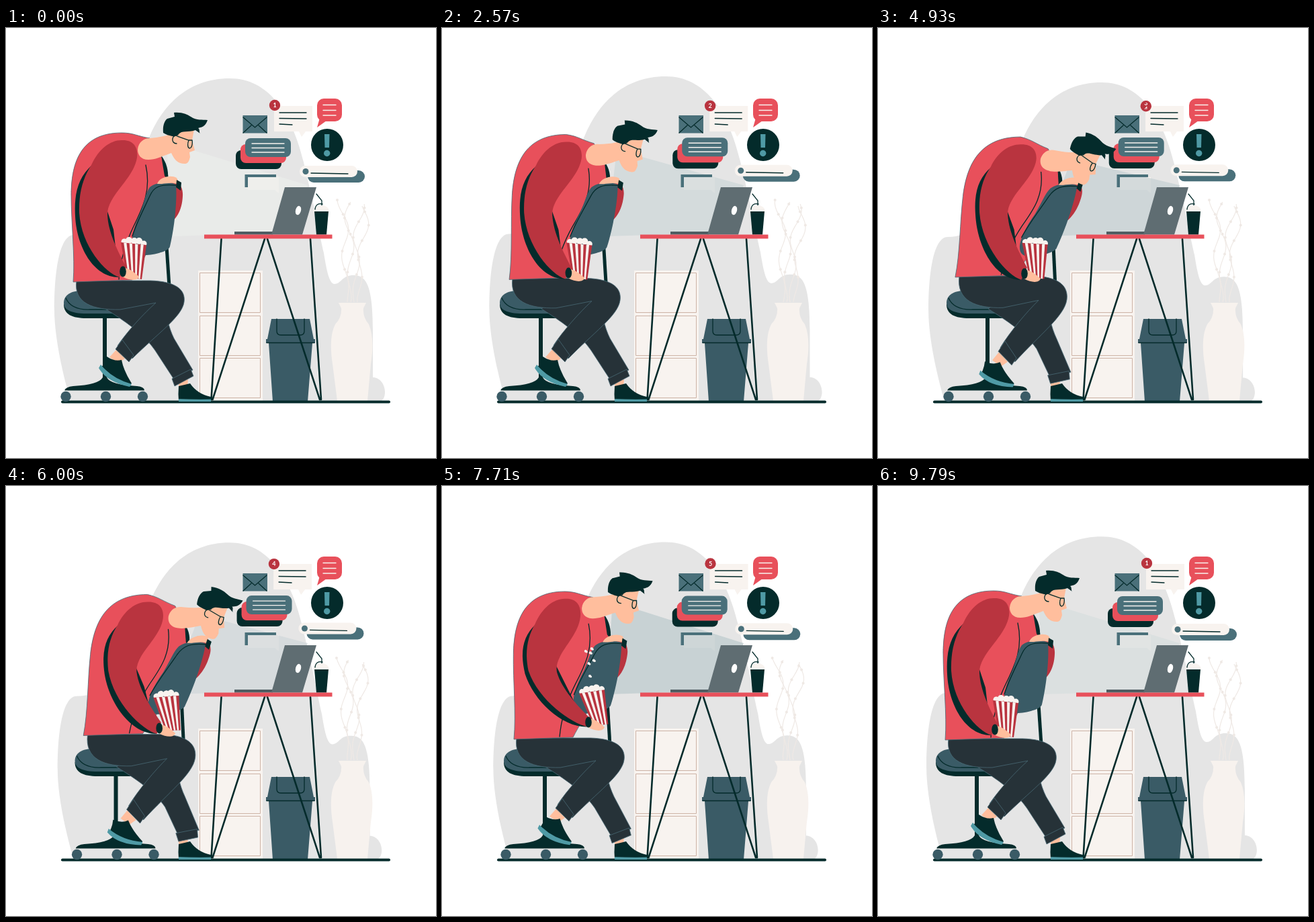
An HTML page that plays this animation: 640 by 640 pixels, repeating every 9870 ms.

```html
<!DOCTYPE html>
<html lang="en">
<head>
<meta charset="utf-8">
<title>Distracted at the desk</title>
<style>
html, body { margin: 0; height: 100%; overflow: hidden; background: #fff; }
svg { display: block; width: 100vw; height: 100vh; }
.red { fill: #e8505b; } .crimson { fill: #b9343f; } .dark { fill: #042b2b; }
.teal { fill: #3a5b66; } .mid { fill: #4a707a; } .sky { fill: #4f9aa5; }
.skin { fill: #ffbe9d; } .pants { fill: #263238; } .pale { fill: #f8f3ef; }
.ink, .chalk { fill: none; stroke: #042b2b; stroke-width: 1.3; stroke-linecap: round; }
.chalk { stroke: #f8f3ef; }
.edge { stroke: #4a6a75; stroke-width: .8; }
text { font: bold 9px Lato, sans-serif; fill: #fff; text-anchor: middle; }
</style>
</head>
<body>
<svg viewBox="0 0 640 640">
  <clipPath id="window"><circle cx="400" cy="115" r="5"/></clipPath>
  <path id="blob" fill="#e5e5e5" d="M96 555C80 500 72 450 72 420C72 360 80 308 101 308C160 308 180 240 213 163C235 110 275 75 333 75C390 75 425 125 443 200C460 270 465 300 473 335C477 360 481 381 489 381C499 381 500 368 517 368C535 368 546 380 546 450V520C556 520 564 530 564 542C564 550 560 555 558 555Z"/>

  <path class="pale" d="M286 361H382V555H286Z"/>
  <path fill="none" stroke="#cdb3a6" d="M288.500 364.500h90v59h-90zM288.500 428.500h90v59h-90zM288.500 491.500h90v59h-90z"/>
  <path class="teal" d="M395 433H452L458 463H460V469H456L449 556H397L391 469H387V463H389Z"/>
  <path class="ink" d="M388 468.500H459M403 433V451Q403 457 409 457H438Q444 457 444 451V433"/>
  <g id="twigs" fill="#efe9e5"></g>
  <path fill="#f7f2ee" d="M495 409H536L532 417Q531 431 540 441Q549 462 543 500L538 555H493L486 500Q480 460 490 441Q500 431 499 417Z"/>

  <path class="pale" d="M360 222H406V246L400 241H360Z"/>
  <path id="beam" opacity=".7"/>
  <path class="mid" d="M355.500 218H402V222H360V237H355.500Z"/>
  <path class="mid" d="M352.500 130H389V156.500H352.500Z"/>
  <path class="ink" d="M353 133L370.500 148L388 133M353 156L365 145M388 156L376 145"/>
  <g id="letter">
    <path class="pale" d="M399 116H456V154H446L440 162L436 154H399Z"/>
    <path class="ink" d="M407 126H447M407 134.500L447 135M407 143L426 144"/>
  </g>
  <g id="badge">
    <circle class="crimson" cx="400" cy="115" r="8.200"/>
    <g clip-path="url(#window)"><text id="now" x="400"/><text id="next" x="400"/></g>
  </g>
  <g id="stack">
    <rect class="dark" x="342" y="182" width="68" height="28" rx="8"/>
    <rect class="red" x="349" y="173" width="68" height="28" rx="8"/>
    <rect class="mid" x="356" y="164" width="68" height="28" rx="8"/>
    <path class="chalk" d="M366 172H414M366 178.500H414M366 185H414"/>
  </g>
  <rect class="red" x="463" y="105" width="37" height="34" rx="10"/>
  <path class="red" d="M467 134L463 148L477 138Z"/>
  <path class="chalk" d="M472 114.500H491M472 122.500H491M472 130H491"/>
  <circle class="dark" cx="478" cy="174" r="24"/>
  <path class="sky" d="M474 158H481.500L481 178H474.500Z"/>
  <circle class="sky" cx="477.700" cy="186.500" r="4.700"/>
  <g id="pill">
    <rect class="mid" x="449" y="212" width="85" height="18" rx="9"/>
    <rect class="pale" x="437" y="205" width="86" height="17" rx="8.500"/>
    <circle class="mid" cx="446" cy="213.500" r="4.500"/>
    <path class="ink" d="M454 216L509 217"/>
  </g>

  <path fill="#4f5d62" d="M340 303H397V307.500H340Z"/>
  <path fill="#5f6d72" d="M415 237H462L441 307.500H395Z"/>
  <ellipse cx="435" cy="271.500" rx="4" ry="6.800" fill="#fff" transform="rotate(15 435 271.500)"/>
  <path class="ink" d="M470 270V257L462 247"/>
  <path class="pale" d="M457 273Q458 264 469 264Q480 264 481 273Z"/>
  <path class="ink" d="M460 270Q461 260 471 262"/>
  <path class="dark" d="M459 273H480L477 307.500H462Z"/>
  <path class="ink" style="stroke-width:2.600" d="M320.500 314L305.500 553M385 314L307.500 553M389 314L467 553M453 314L469 553"/>
  <path class="red" d="M295 307.500H485.500V313.500H295Z"/>
  <path class="ink" style="stroke-width:4" d="M84 556.500H570"/>

  <g id="chair">
    <path class="dark" d="M86 411C86 426 98 432 120 432H185V420Z"/>
    <path class="teal" d="M86 409C86 396 100 390 115 391L190 400V425H120C96 425 86 419 86 409Z"/>
    <path class="ink" d="M89 402Q97 420 125 419H165"/>
    <path class="dark" d="M144 430H150V520Q155 531 195 533Q206 534 206 539.500H87Q89 534 100 533Q138 531 144 520Z"/>
    <g class="teal"><circle cx="89" cy="548.500" r="7.700"/><circle cx="148.500" cy="548.500" r="7.700"/><circle cx="203.500" cy="548.500" r="7.700"/></g>
  </g>

  <path class="skin" d="M256 527L271 523L270 534L258 535Z"/>
  <path class="dark" d="M257 533Q266 531 274 529Q285 545 305 549V555H257Q256 545 257 533Z"/>
  <path class="sky" d="M257 552Q280 553 305 552.500V556H257Z"/>
  <path class="ink" style="stroke-width:5;stroke-linecap:butt" data-warp="back" d="M239 325L243 385"/>
  <path class="pants edge" data-warp="backLeg" d="M148 418L170 400L240 400C236 425 242 445 250 462L278 509L250 523L222 480C205 455 175 435 148 418Z"/>
  <path class="pants edge" data-warp="backLeg" d="M275 508L279 518L251 533L247 522Z"/>

  <path class="skin" data-warp="frontLeg" d="M164 479L177 492L167 499L154 490Z"/>
  <g id="shoe">
    <path class="dark" d="M150 489Q162 497 172 494Q175 510 187 529Q184 533 180 532Q155 525 140 507Q147 500 150 489Z"/>
    <path class="sky" d="M138 506Q150 527 184 534L187 530Q158 522 141 501Z"/>
  </g>
  <path class="pants edge" data-warp="frontLeg" d="M105 376L215 376C250 377 268 388 265 408C262 430 225 455 188 492L166 473C180 452 205 425 223 409L170 419C130 420 100 410 105 376Z"/>
  <path class="pants edge" data-warp="frontLeg" d="M173 464L190 487L183 497L163 478Z"/>

  <path class="red edge" data-warp="body" d="M100 378C103 340 97 290 97 250C97 205 108 156 172 156C190 156 195 161 214 164L232 192C240 210 241 215 242 235C235 300 205 340 188 375Z"/>
  <path class="crimson" data-warp="back" d="M238 222C255 224 264 235 263 250C262 275 250 290 238 292Z"/>
  <path class="dark" data-warp="body" d="M231 190C239 200 242 212 241 226L236 220Z"/>
  <path class="ink" data-warp="body" d="M208 204C216 240 205 265 190 295C178 320 170 345 168 374"/>
  <path class="teal" data-warp="back" d="M214 237C222 229 245 228 253 233C255 260 250 300 244 325C243 334 205 342 195 336C182 328 188 300 200 275C207 255 208 245 214 237Z"/>
  <path class="ink" data-warp="back" d="M253 234C230 232 220 236 214 250C205 270 194 290 188 310"/>
  <path class="skin" data-warp="back" d="M225 232C228 222 245 218 254 223L259 234C250 229 240 231 232 232Z"/>
  <path class="dark" data-warp="back" d="M254 226L261 230L260 242L253 237Z"/>

  <g id="head">
    <path class="skin" d="M214 164Q235 162 244 158L280 151L277 167L281 182L273 185L274 192C272 200 270 202 266 202C255 202 250 195 246 186C230 192 222 196 212 196C200 196 196 188 196 181C197 170 205 164 214 164Z"/>
    <path class="dark" d="M234 156C233 145 236 138 240 135L251 132L250 126C262 125 270 129 275 132C284 138 292 136 300 137C297 147 290 148 286 149C289 151 287 155 289 157L282 152C270 156 262 152 257 158L250 162C245 160 240 160 234 156Z"/>
    <path class="ink" d="M256 159C246 159 245 172 254 172M252 160L272 167H277C278 174 276 179 273 179C270 178 270 172 272 167"/>
  </g>

  <g id="flying" class="pale"></g>
  <g id="bucket">
    <g class="pale"><circle cx="176" cy="318" r="4.500"/><circle cx="183" cy="316" r="5"/><circle cx="191" cy="317" r="5"/><circle cx="198" cy="317" r="5"/><circle cx="205" cy="321" r="4.500"/></g>
    <path class="crimson" d="M171 319L209 323L202 374L180 371Z"/>
    <g id="stripes" class="pale"></g>
  </g>
  <path class="dark" data-warp="arm" d="M128 204C108 222 101 245 103 280C105 325 130 371 168 371L160 300Z"/>
  <path class="crimson" data-warp="arm" d="M172 167C190 166 197 178 195 193C190 225 150 250 151 278C152 305 168 335 178 354L169 371C148 365 112 325 109 275C108 245 115 222 127 204C138 180 155 167 172 167Z"/>
  <g id="hand">
    <path class="skin" d="M176 357C185 358 192 365 198 370C196 376 186 377 173 370Z"/>
    <ellipse class="dark" cx="174" cy="362.500" rx="4.800" ry="8"/>
  </g>
</svg>
<script>
const LOOP = 9870, TAU = Math.PI * 2;
const keys = [0, 1570, 3500, 4930, 6860, 7710, 9790];
// Pose values at the key times; the last key repeats the first unless given.
const tracks = {
  chair:   [0, 0, 2, 16, 14, 6],
  hemX:    [0, 0, 2, 15, 13, 7],
  hemY:    [0, -3, -4, -7, -5, -1],
  topX:    [0, 10, 17, 40, 31, 11],
  topY:    [0, 2, 3, 6, 4, 1],
  tilt:    [0, .1, .17, .25, .18, .02],
  headX:   [0, 15, 26, 52, 41, 13],
  headY:   [0, 8, 13, 24, 14, 2],
  nod:     [0, 3, 6, 16, 5.5, 2],
  backTop: [0, 5, 15, 43, 37, 14],
  backLow: [0, 1, 4, 21, 18, 7],
  elbow:   [0, 8, 20, 42, 38, 19],
  handX:   [0, 4, 26, 44, 58, 44],
  handY:   [0, 2, 2, 3, -7, -11],
  bucketX: [0, 6, 24, 43.5, 47.5, 33],
  bucketY: [0, 2, -1, 0, -14, -15],
  bucketR: [0, 3, -3, -2, -17, -14],
  drift:   [0, .7, 1.7, 1.7, 1.3, .7],
  glow:    [0, 1, .25, .82, .45, 1, .45]
};
const $ = id => document.getElementById(id);
const lerp = (a, b, s) => a + (b - a) * s;
const clamp = s => Math.min(1, Math.max(0, s));
const place = (id, x, y, r = 0, cx = 0, cy = 0) =>
  $(id).setAttribute('transform', `translate(${x} ${y}) rotate(${r} ${cx} ${cy})`);

function sample(v, t) {
  const val = i => v[i] ?? v[0];
  const slope = i => i % 6 ? (val(i + 1) - val(i - 1)) / (keys[i + 1] - keys[i - 1]) : 0;
  if (t >= keys[6]) return lerp(val(6), v[0], (t - keys[6]) / (LOOP - keys[6]));
  const i = keys.findIndex((k, n) => t < keys[n + 1]);
  const d = keys[i + 1] - keys[i], s = (t - keys[i]) / d, q = 1 - s;
  return val(i) * (1 + 2 * s) * q * q + val(i + 1) * s * s * (3 - 2 * s)
    + d * s * q * (slope(i) * q - slope(i + 1) * s);
}

// Parabola through three offsets along the arm: shoulder, elbow, hand.
const bend = (y, a, b, c) =>
  a * (y - 272) * (y - 362) / 19584 + b * (y - 170) * (y - 362) / -9180 + c * (y - 170) * (y - 272) / 17280;

const warps = {
  body(x, y, p) {
    const u = (377 - y) / 220;
    return [x + lerp(p.hemX, p.topX, u), y + lerp(p.hemY, p.topY, u) + u * p.tilt * Math.max(0, x - 172)];
  },
  back: (x, y, p) => [x + lerp(p.backLow, p.backTop, Math.max(0, (330 - y) / 95)), y + p.backTop * .04],
  backLeg(x, y, p) {
    const u = clamp((y - 430) / 90) ** 3;
    return [x + p.chair * lerp(1, .35, u), y + u * p.chair * .02 * (x - 263)];
  },
  frontLeg: (x, y, p) => [x + p.chair, y + lerp(p.hemY, p.chair * .3, clamp((y - 377) / 115))],
  arm: (x, y, p) => [x + bend(y, p.topX, p.elbow, p.handX), y + bend(y, p.topY, 0, p.handY)]
};
const soft = [...document.querySelectorAll('[data-warp]')].map(el =>
  ({ el, rest: el.getAttribute('d'), warp: warps[el.dataset.warp] }));

for (let j = 1; j < 8; j += 2) {
  const top = s => `${lerp(171, 209, s)} ${lerp(319, 323, s)}`;
  const low = s => `${lerp(180, 202, s)} ${lerp(371, 374, s)}`;
  $('stripes').innerHTML += `<path d="M${top(j / 9)}L${top((j + 1) / 9)}L${low((j + 1) / 9)}L${low(j / 9)}Z"/>`;
}

function drawTwigs(t) {
  const sway = Math.sin(TAU * t / LOOP);
  $('twigs').innerHTML = [501, 511, 526, 535].map((tip, j) => {
    const at = s => [lerp(508 + j * 5, tip, s) + (2 * sway + 8 * Math.sin(s * 11 + j * 1.8 + sway * .4)) * s ** .5,
      408 - s * (152 - j * 3)];
    const line = Array.from({ length: 31 }, (_, i) => at(i / 30).map(n => n.toFixed(1)).join(' ')).join('L');
    const dots = [.32, .5, .7, .86, 1].map(s => at(s - j * .02)).map(([x, y]) => `<circle cx="${x}" cy="${y}" r="2"/>`);
    return `<path d="M${line}" fill="none" stroke="#efe9e5" stroke-width="1.2"/>` + dots.join('');
  }).join('');
}

function drawFlying(t, p) {
  let out = '';
  for (let i = 0; i < 6; i++) {
    const s = (t - 6700 - i * 160) / 1100;
    if (s <= 0 || s >= 1) continue;
    const x = 190 + p.bucketX + Math.sin(i * 2.3) * 10 * s - 3, y = 315 + p.bucketY - 232 * s * (1 - s);
    out += `<circle cx="${x}" cy="${y}" r="2"/><circle cx="${x + 1.5}" cy="${y + 1}" r="1.6"/>`;
  }
  $('flying').innerHTML = out;
}

function drawCount(t) {
  const step = LOOP / 5, n = (t + 994) / step, count = Math.floor(n + .5) - 1;
  const turn = (n + .5) % 1 * step;
  const shift = clamp((turn - step / 2 + 200) / 400);
  $('now').textContent = (count + 5) % 5 + 1;
  $('next').textContent = (count + 1) % 5 + 1;
  $('now').setAttribute('y', 118.3 - 9 * shift);
  $('next').setAttribute('y', 127.3 - 9 * shift);
}

function draw(t) {
  const p = {};
  for (const name in tracks) p[name] = sample(tracks[name], t);

  const size = 1 - (3 - 7 * Math.cos(TAU * (t - 1750) / LOOP)) / 480;
  $('blob').setAttribute('transform', `translate(320 555) scale(${size}) translate(-320 -555)`);
  for (const { el, rest, warp } of soft)
    el.setAttribute('d', rest.replace(/([\d.]+) ([\d.]+)/g, (_, x, y) => warp(+x, +y, p).map(n => n.toFixed(2)).join(' ')));

  place('chair', p.chair, 0);
  place('shoe', p.chair, 0, -.65 * p.chair, 187, 531);
  place('head', p.headX, p.headY, p.nod, 234, 155);
  place('hand', p.handX, p.handY);
  place('bucket', p.bucketX, p.bucketY, p.bucketR, 190, 321);
  place('letter', -p.drift * .6, 0);
  place('badge', -p.drift * .7, p.drift * .7);
  place('stack', p.drift, -p.drift * .6);
  place('pill', -p.drift, -p.drift);

  $('beam').setAttribute('d', `M245 310L${240 + p.headX} 184L${272 + p.headX} ${180 + p.headY}L449 234L420 307L345 307Z`);
  $('beam').setAttribute('fill', `rgb(${lerp(236, 189, p.glow)} ${lerp(238, 202, p.glow)} ${lerp(235, 206, p.glow)})`);
  drawTwigs(t);
  drawFlying(t, p);
  drawCount(t);
}

const start = performance.now();
function frame() {
  draw((performance.now() - start) % LOOP);
  requestAnimationFrame(frame);
}
frame();
</script>
</body>
</html>
```
